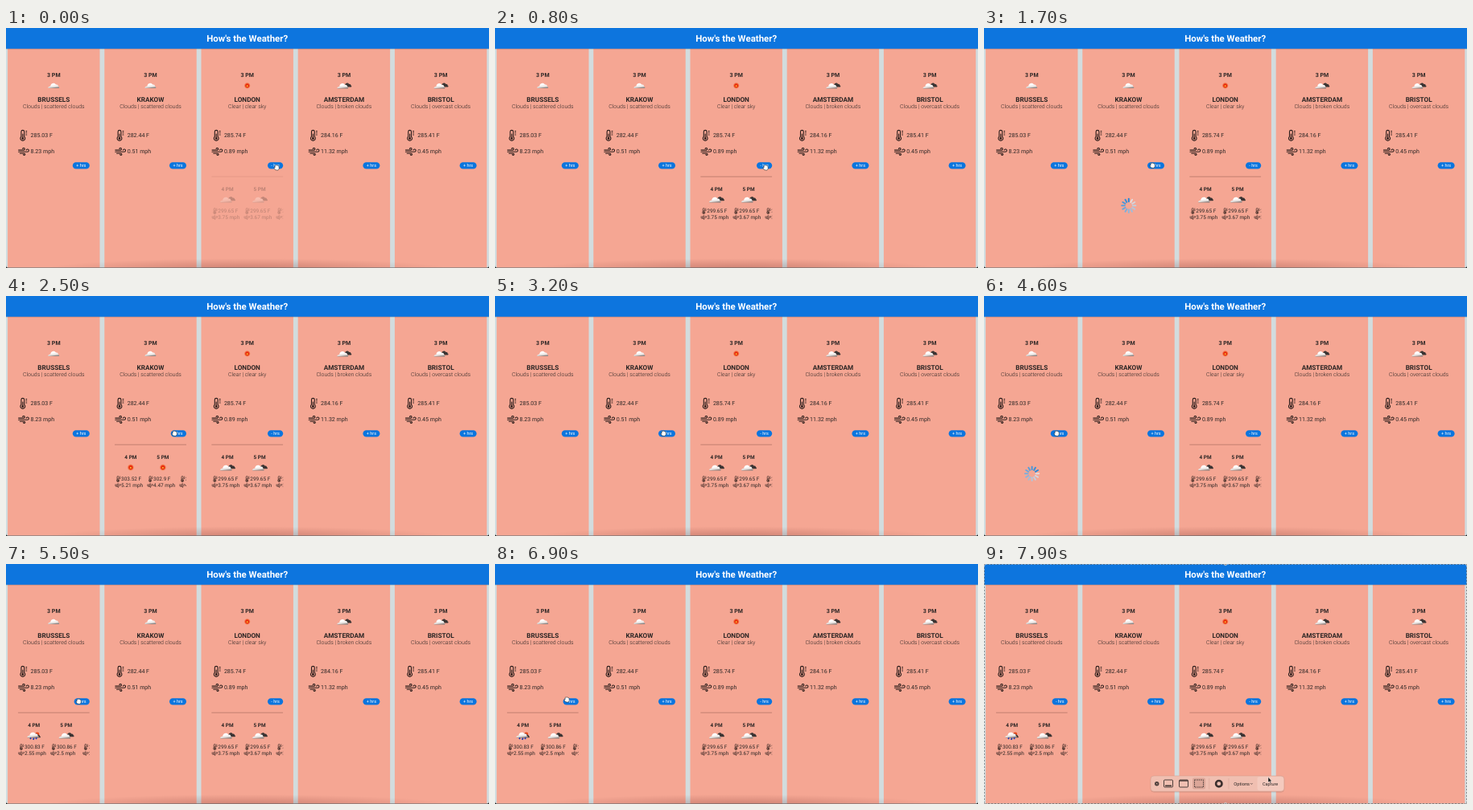
Recreate the animation shown at these times as an HTML page. Size 600 by 299 pixels, loop 8 s.

```html
<!DOCTYPE html>
<html lang="en">
<head>
<meta charset="utf-8">
<title>How's the Weather?</title>
<style>
  html, body { margin: 0; width: 100%; height: 100%; overflow: hidden; background: #d2dcde; }
  svg { display: block; width: 100%; height: 100%; font: 7.05px Roboto, sans-serif; text-rendering: geometricPrecision; }
  text { fill: #2c2625; }
  .mid { text-anchor: middle; }
  .bold { font-weight: 700; }
  .city { font-size: 8.2px; }
  .desc { font-size: 6.95px; font-weight: 300; }
  .small { font-size: 6.45px; }
  .btn { font-size: 5.5px; fill: #fff; }
  .line { fill: none; stroke: #2a1c1a; stroke-width: 1.1; stroke-linecap: round; }
  .bar { fill: none; stroke: #3c302e; stroke-width: .9; }
</style>
</head>
<body>
<svg id="stage" viewBox="0 0 600 299" preserveAspectRatio="none">
  <defs>
    <linearGradient id="puff" x2=".25" y2="1">
      <stop offset=".45" stop-color="#fff"/><stop offset=".85" stop-color="#dcd6d3"/><stop offset="1" stop-color="#8d8482"/>
    </linearGradient>
    <radialGradient id="glow">
      <stop offset=".45" stop-color="#e8280c"/><stop offset=".7" stop-color="#f0602c" stop-opacity=".8"/><stop offset="1" stop-color="#f58a60" stop-opacity="0"/>
    </radialGradient>
    <radialGradient id="dusk">
      <stop offset="0" stop-color="#400" stop-opacity=".22"/><stop offset="1" stop-color="#400" stop-opacity="0"/>
    </radialGradient>
    <filter id="shadow" x="-10%" width="120%" y="-20%" height="140%">
      <feDropShadow dx="0" dy=".5" stdDeviation=".7" flood-opacity=".25"/>
    </filter>
    <clipPath id="strip"><rect x="-44.5" y="180" width="89" height="70"/></clipPath>
    <path id="cloud" d="M-6.9 3.3c-.4-1.7 1.2-2.7 2.8-2.6c.2-3.7 4.9-5.4 6.8-2c2.2-.4 3.1.9 2.9 2.2c1.5.4 1.7 1.8.8 2.4z"/>
    <g id="scattered"><use href="#cloud" fill="url(#puff)"/></g>
    <g id="broken">
      <use href="#cloud" transform="translate(4.2 -.9) scale(.75)" fill="#3a3332"/>
      <use href="#cloud" x="-1.6" y=".4" fill="url(#puff)"/>
    </g>
    <g id="clear"><circle r="4.2" fill="url(#glow)"/><circle cy=".4" r="1" fill="#fbc02c"/></g>
    <g id="rain">
      <circle cx="4" cy="-1.6" r="2.3" fill="#e84a1e"/>
      <use href="#cloud" transform="translate(3 .2) scale(.7)" fill="#3a3332"/>
      <use href="#cloud" x="-1" y="-.6" fill="url(#puff)"/>
      <path d="M-3.5 2.6l-.8 1.8M0 3l-.8 2.2M3.2 2.6l-.8 1.8" stroke="#1c3cb0" stroke-width="1.7"/>
    </g>
    <g id="thermo" class="line">
      <path d="M2 8.3V2.3a1.9 1.9 0 0 1 3.8 0V8.3a2.9 2.9 0 1 1-3.8 0zM3.9 5V10M8 1.6h.8M8 3.8h.8M8 6h.8"/>
      <circle cx="3.9" cy="10.6" r=".9" fill="#2a1c1a"/>
    </g>
    <path id="wind" class="line" d="M.6 3.1h6.4a1.3 1.3 0 1 0-1.3-1.6M.6 5.2h11.2a1.6 1.6 0 1 0-1.6-2M2.4 7.2h5.2a1.1 1.1 0 1 1-1.1 1.4"/>
    <path id="hand" d="M-1.4 2.8L-3 .4q.1-1 1.1-.5V-2.6q.8-1 1.5-.2q.8-.8 1.4.1q1-.4 1.3.6q.9 0 .9 1V1.4L2 3.2z" fill="#fff" stroke="#222" stroke-width=".55"/>
    <path id="arrow" d="M0-2.5V4L1.5 2.7L2.6 5L3.6 4.5L2.6 2.4H4.5z" fill="#111" stroke="#fff" stroke-width=".4"/>
  </defs>
  <rect width="600" height="299" fill="#d2dcde"/>
  <g id="cards"></g>
  <ellipse cx="300" cy="300" rx="250" ry="13" fill="url(#dusk)"/>
  <path d="M0 298.8H600" stroke="#292322" stroke-width=".5"/>
  <path d="M0 296v3h3q-3 0-3-3M600 296v3h-3q3 0 3-3" fill="#111"/>
  <rect width="600" height="25.8" fill="#0a75de" filter="url(#shadow)"/>
  <text class="mid bold" x="299.7" y="16.6" style="font-size:11.45px;fill:#fff">How's the Weather?</text>
  <g id="capture">
    <rect width="600" height="299" fill="none" stroke="#ddd"/>
    <rect width="600" height="299" fill="none" stroke="#444" stroke-dasharray="2 2"/>
    <g id="grips" fill="#999" stroke="#fff" stroke-width=".4"></g>
    <rect x="207" y="264" width="166" height="19.3" rx="4" fill="#f0bfb1" stroke="#d59c8d" stroke-width=".5" filter="url(#shadow)"/>
    <rect x="259" y="266.5" width="16" height="14" rx="2" fill="#dba698"/>
    <rect x="339.5" y="265" width="32.5" height="17.3" rx="3" fill="#f4cabe"/>
    <circle cx="214.7" cy="273.7" r="2.7" fill="#4a3d3a"/>
    <path d="M213.8 272.8l1.8 1.8m0-1.8l-1.8 1.8" stroke="#f0bfb1" stroke-width=".6"/>
    <g class="bar">
      <rect x="223.5" y="269" width="11" height="9" rx="1"/><path d="M225 276.2h8" stroke-width="1.4"/>
      <rect x="242.5" y="269" width="11" height="9" rx="1"/><path d="M243 270h10" stroke-width="1.4"/>
      <rect x="261.5" y="269" width="11" height="9" stroke-dasharray="1.6 1"/>
      <circle cx="291.8" cy="273.7" r="3.7" stroke-width="2.6"/>
      <path d="M331.2 273.2l1.2 1.2l1.2-1.2" stroke-width=".7"/>
      <path d="M279.7 267v13.5M304 267v13.5" stroke="#d5a092" stroke-width=".5"/>
    </g>
    <text x="310.3" y="275.6" style="font-size:5.7px">Options</text>
    <text class="mid" x="355.6" y="275.6" style="font-size:5.5px">Capture</text>
  </g>
  <use id="cursor"/>
</svg>
<script>
const LOOP = 8000;
const $ = id => document.getElementById(id);
const use = (id, x, y, scale = 1) => `<use href="#${id}" transform="translate(${x} ${y}) scale(${scale})"/>`;
const text = (x, y, cls, s) => `<text x="${x}" y="${y}" class="${cls}">${s}</text>`;

// load: spinner start, open: fade-in start, shut: collapse
const cities = [
  { name: 'BRUSSELS', sky: 'scattered', desc: 'Clouds | scattered clouds', temp: '285.03', wind: '8.23',
    load: 4150, open: 4750, shut: LOOP,
    hours: [['rain', '300.83', '2.55'], ['broken', '300.86', '2.5'], ['broken', '299.1', '2.4']] },
  { name: 'KRAKOW', sky: 'scattered', desc: 'Clouds | scattered clouds', temp: '282.44', wind: '0.51',
    load: 1450, open: 1950, shut: 3200,
    hours: [['clear', '303.52', '5.21'], ['clear', '302.9', '4.47'], ['clear', '301.2', '4.1']] },
  { name: 'LONDON', sky: 'clear', desc: 'Clear | clear sky', temp: '285.74', wind: '0.89',
    load: -900, open: -150, shut: LOOP,
    hours: [['broken', '299.65', '3.75'], ['broken', '299.65', '3.67'], ['broken', '298.4', '3.5']] },
  { name: 'AMSTERDAM', sky: 'broken', desc: 'Clouds | broken clouds', temp: '284.16', wind: '11.32' },
  { name: 'BRISTOL', sky: 'broken', desc: 'Clouds | overcast clouds', temp: '285.41', wind: '0.45' }
];

const hour = ([sky, temp, wind], i) => {
  const x = -24.6 + 40 * i;
  return text(x, 202.9, 'mid bold small', `${4 + i} PM`) + use(sky, x, 213.6, 1.05) +
    use('thermo', x - 18, 224.2, .56) + use('wind', x - 19.6, 233.4, .54) +
    text(x - 11.8, 230.2, 'small', temp + ' F') + text(x - 11.8, 238.2, 'small', wind + ' mph');
};

const button = (sign, w) => `<g><rect x="${44.5 - w}" y="167.2" width="${w}" height="8.4" rx="4.2" fill="#0a75de"/>` +
  text(44.5 - w / 2, 173.3, 'mid btn', sign + ' hrs') + '</g>';

const spinner = '<g transform="translate(.3 221.3)">' + Array.from({ length: 12 }, (_, i) =>
  `<path d="M0-5V-8.6" transform="rotate(${i * 30})" stroke-width="2" stroke-linecap="round"/>`).join('') + '</g>';

const card = (c, i) => `<g transform="translate(${59.3 + 120.2 * i} 0)">
  <rect x="-57.2" y="20" width="114.4" height="278.5" fill="#f5a693"/>` +
  text(0, 60.9, 'mid bold', '3 PM') + use(c.sky, 0, 71.8) +
  text(0, 91.8, 'mid bold city', c.name) + text(0, 100.3, 'mid desc', c.desc) +
  use('thermo', -42.4, 127) + use('wind', -44.3, 149) +
  text(-28.8, 136.4, '', c.temp + ' F') + text(-28.8, 156.2, '', c.wind + ' mph') +
  button('+', 21) + button('-', 19.2) + spinner +
  `<g clip-path="url(#strip)"><path d="M-44.5 185.2H44.5" stroke="#a0665a" stroke-width=".6"/>${(c.hours || []).map(hour).join('')}</g></g>`;

$('cards').innerHTML = cities.map(card).join('');
[...$('cards').children].forEach((g, i) => {
  [cities[i].plus, cities[i].minus, cities[i].spin, cities[i].panel] = [...g.children].slice(-4);
});
$('grips').innerHTML = [0, 300, 600].flatMap(x => [0, 149.5, 299].filter(y => x !== 300 || y !== 149.5)
  .map(y => `<circle cx="${x}" cy="${y}" r="1.8"/>`)).join('');

const clamp = v => Math.max(0, Math.min(1, v));
const show = (el, on) => el.setAttribute('display', on ? 'inline' : 'none');

// cursor moves: start, end, x, y
const moves = [[800, 1350, 209, 171.3], [3300, 3850, 90, 171.3], [6300, 6800, 89, 169], [7100, 7700, 353, 268]];

function draw(t) {
  for (const c of cities) {
    const open = t >= c.open && t < c.shut;
    const loading = t >= c.load && t < c.open;
    show(c.plus, !open);
    show(c.minus, open);
    show(c.panel, open);
    show(c.spin, loading);
    if (open) c.panel.setAttribute('opacity', clamp((t - c.open) / 550));
    if (loading) {
      const head = Math.floor((t - c.load) / 1000 * 12) + 9;
      [...c.spin.children].forEach((p, i) => {
        const age = ((head - i) % 12 + 12) % 12 / 11;
        p.setAttribute('stroke', `rgb(${40 + 190 * age},${135 + 85 * age},${215 + 5 * age})`);
      });
    }
  }
  let x = 336, y = 174;
  for (const [from, to, nx, ny] of moves) {
    const p = clamp((t - from) / (to - from)), e = p * p * (3 - 2 * p);
    x += (nx - x) * e;
    y += (ny - y) * e;
  }
  const moving = moves.some(([from, to], i) => i !== 2 && t > from + 60 && t < to - 60);
  $('cursor').setAttribute('href', moving || t >= 7000 ? '#arrow' : '#hand');
  $('cursor').setAttribute('transform', `translate(${x} ${y})`);
  show($('capture'), t >= 7000);
}

const start = performance.now();
function tick() {
  draw((performance.now() - start) % LOOP);
  requestAnimationFrame(tick);
}
tick();
</script>
</body>
</html>
```
